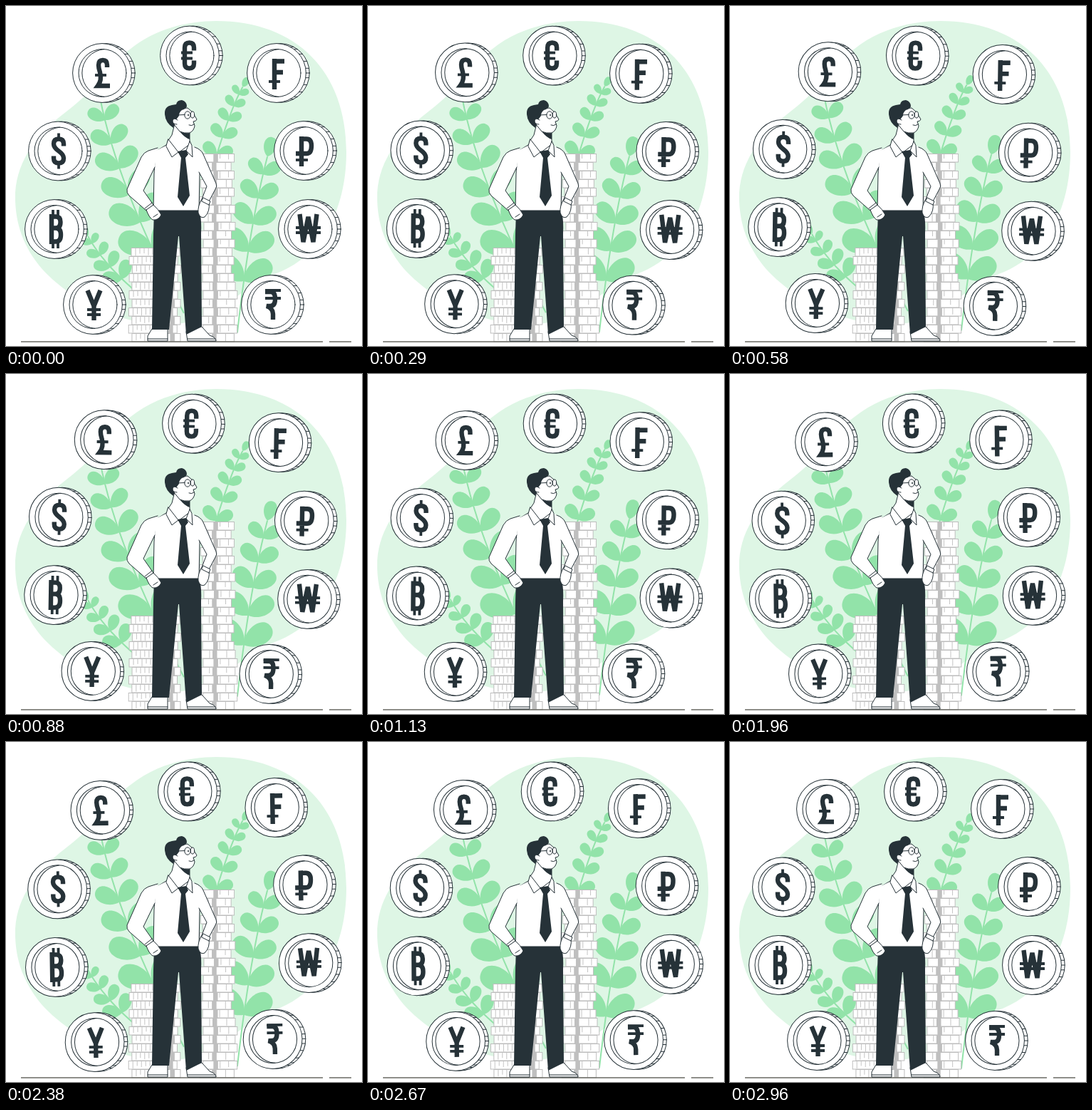
Animation of 500x477 px, one loop 3 s. Source, as an HTML page:

```html
<!DOCTYPE html>
<html lang="en">
<head>
<meta charset="utf-8">
<title>Currencies</title>
<style>
html, body { margin: 0; width: 100%; height: 100%; overflow: hidden; background: #fff; }
svg { display: block; width: 100%; height: 100%; }
.leaf { fill: #92e3a9; }
.stem { fill: none; stroke: #92e3a9; stroke-width: 2; }
.line { fill: #fff; stroke: #263238; stroke-width: 1; stroke-linejoin: round; stroke-linecap: round; }
.thin { fill: none; stroke: #263238; stroke-width: 1; stroke-linecap: round; }
.dark { fill: #263238; }
.bill { fill: #fff; stroke: #bdbdbd; stroke-width: 1; }
.tick { fill: none; stroke: #c4c4c4; stroke-width: 1; }
.band { fill: #bfbfbf; }
.bold { fill: none; stroke: #263238; stroke-width: 6.4; }
.bar { fill: none; stroke: #263238; stroke-width: 3.8; }
</style>
</head>
<body>
<svg viewBox="0 0 500 477">
  <path fill="#def6e5" d="M13 262C16 215 45 178 85 148C135 110 140 85 175 60C210 32 255 21 295 21C408 21 478 92 478 205C478 290 440 350 385 373C330 392 300 440 240 446C150 452 75 400 45 362C22 332 12 300 13 262Z"/>
  <g id="plants"></g>
  <g id="stacks"></g>
  <path d="M21 471H445M454 471H485" stroke="#6b6b64" stroke-width="1.6"/>
  <g id="man">
    <path class="line" d="M205 453L199 463V470H227V453Z"/>
    <path class="line" d="M253 457L255 470H295Q295 465 286 462L275 450Z"/>
    <path class="thin" d="M199 467H227M255 467H294"/>
    <path class="dark" d="M208 287H272Q275 302 274 320L275 450L253 461L243 323H242L229 454H205L207 320Z"/>
    <path class="line" d="M225 195L210 204L208 235L207 287H271L272 235L274 204L259 196Z"/>
    <path class="line" d="M213 199L200 203Q194 205 190 212L170 257Q169 262 173 266L197 287L207 279L193 259L209 226"/>
    <path class="line" d="M265 198Q274 201 277 208L295 249Q297 253 294 257L284 276L275 271L282 253L271 233"/>
    <path fill="#fff" d="M212 202L225 196H262L273 206L270 230H211Z"/>
    <path class="line" d="M197 286L207 279Q214 285 218 293Q214 301 206 300Q201 297 197 286Z"/>
    <path class="thin" d="M195 284L205 276M207 296L213 292"/>
    <path class="line" d="M285 276L275 271Q269 281 270 290Q273 299 279 296Q287 288 285 276Z"/>
    <path class="line" d="M277 269L287 274L285 279L275 274Z"/>
    <path class="line" d="M237 165L233 181L227 190L242 206L258 194V177Z"/>
    <path class="line" d="M238 150Q246 143 255 143L262 149L268 159Q267 162 263 162L265 168Q264 175 258 178Q250 179 244 176L235 165Z"/>
    <path class="dark" d="M244 176Q250 179 258 178V187Q251 185 244 176Z"/>
    <path class="dark" d="M235 171Q224 164 223 152Q222 141 233 139L239 138Q240 132 247 132Q254 134 254 141Q252 145 247 146Q243 149 243 154L240 158Q237 165 235 171Z"/>
    <path class="line" d="M241 160Q235 156 234 161Q234 166 240 166"/>
    <ellipse class="line" cx="255" cy="153" rx="4.2" ry="5.2"/>
    <ellipse class="line" cx="262" cy="152.5" rx="2.6" ry="4.6"/>
    <path class="thin" d="M241 153L251 152.5M257 167Q261 169 264 166"/>
    <circle class="dark" cx="256" cy="153" r="1.1"/>
    <path class="line" d="M228 187L242 205L233 212L225 197Z"/>
    <path class="line" d="M258 190L253 203L262 212L261 196Z"/>
    <path class="dark" d="M241 204L253 202L256 208L252 213L258 266L249 281L241 268L246 213Z"/>
  </g>
  <g id="coins"></g>
</svg>
<script>
const NS = 'http://www.w3.org/2000/svg';
const byId = id => document.getElementById(id);

function add(parent, tag, attrs) {
  const el = document.createElementNS(NS, tag);
  for (const key in attrs) el.setAttribute(key, attrs[key]);
  parent.append(el);
  return el;
}
const path = (parent, cls, d) => add(parent, 'path', { class: cls, d });

let seed = 7;
const random = () => (seed = seed * 16807 % 2147483647) / 2147483647;

function drawLeaf([x, y], angle, size) {
  const w = 0.43 * size;
  path(byId('plants'), 'leaf', `M0 0C${-w} ${-0.28 * size} ${-w} ${-size} 0 ${-size}C${w} ${-size} ${w} ${-0.28 * size} 0 0Z`)
    .setAttribute('transform', `translate(${x} ${y}) rotate(${angle})`);
}

// Leaf pairs grow evenly along a quadratic curve from a to c, one leaf at the tip
function drawPlant(a, b, c, pairs, small, big) {
  const at = t => a.map((v, i) => (1 - t) ** 2 * v + 2 * t * (1 - t) * b[i] + t * t * c[i]);
  const lean = t => {
    const [x, y] = at(t - 0.01), [x2, y2] = at(t + 0.01);
    return Math.atan2(x - x2, y2 - y) * 180 / Math.PI;
  };
  const points = [];
  for (let i = -2; i <= 14; i++) points.push(at(i / 10));
  path(byId('plants'), 'stem', 'M' + points.join('L'));
  drawLeaf(at(-0.2), lean(-0.2), small);
  for (let i = 0; i < pairs; i++) {
    const t = i / (pairs - 1);
    for (const side of [-50, 50]) drawLeaf(at(t), lean(t) * 0.75 + side, small + (big - small) * t);
  }
}

// Rows of banknotes, 12 px high, down to the ground
function drawStack(rows, left, right, band, gap) {
  const g = byId('stacks');
  for (let i = 0; i < rows; i++) {
    const y = 471 - (rows - i) * 12;
    const dx = (i % 2 ? -2 : 2) + random() * 2;
    const x = left + dx, end = right + dx + (y > 380 && rows > 15 ? 4 : 0);
    add(g, 'rect', { class: 'bill', x, y: y + 0.5, width: end - x, height: 11.5 });
    add(g, 'rect', { class: 'band', x: band + dx / 2, y, width: 6.5, height: 12 });
    let d = '';
    for (let tx = x + gap; tx < end - 2; tx += gap)
      if (tx < band - 2 || tx > band + 9) d += `M${tx} ${y + 1}v${6 + random() * 5}`;
    path(g, 'tick', d);
  }
}

// Currency signs: bold strokes, then thin bars
const coins = [
  [258, 69.5, 'M6 -7V-11Q6 -18 -.5 -18Q-7 -18 -7 -11V11Q-7 18 -.5 18Q6 18 6 11V7', 'M-12 -4H4M-12 4H4'],
  [135, 94, 'M7 -8V-11Q7 -18 1 -18Q-5 -18 -5 -11Q-5 -7 -3 -1Q0 10 -6 18H11', 'M-10 3H6'],
  [73, 203.5, 'M8 -7V-10Q8 -17 1 -17Q-6 -17 -6 -10Q-6 -5 1 0Q8 5 8 10Q8 17 1 17Q-6 17 -6 10V7', 'M1 -25V-17M1 17V25'],
  [68, 313, 'M-4 -21V21M-4 -17.5H2Q8.5 -17.5 8.5 -10Q8.5 -1.5 2 -1.5H-4M2 -1.5Q9 -1.5 9 8Q9 17.5 2 17.5H-4', 'M-2 -27V-19M5 -27V-19M-2 19V27M5 19V27'],
  [122, 419, 'M-7.5 -20L1.5 2L10.5 -20M1.5 0V22', 'M-8 7H11M-8 14H11'],
  [380, 94, 'M-3 -20V23M-3 -16.5H11M-3 -1H9', 'M-11 12H5'],
  [418, 203, 'M-3 -20V22M-3 -16.5H4Q11 -16.5 11 -7Q11 4 4 4H-11', 'M-11 13H6'],
  [424, 313, 'M-11.5 -21L-6.5 18L.5 -17L7.5 18L12.5 -21', 'M-17 -2H18M-17 5H18'],
  [372, 419, 'M-8 -18H0Q6 -18 6 -8Q6 2 -1 2H-6Q3 5 3 13V21', 'M-8 -20H14M-8 -9H14']
];

function drawCoin([x, y, bold, bars]) {
  const g = add(byId('coins'), 'g', { transform: `translate(${x} ${y})` });
  const disc = (cx, r) => add(g, 'circle', { class: 'line', cx, cy: 0, r });
  disc(4.8, 41.4);
  let d = '';
  for (let i = -5; i <= 5; i++) {
    const t = i * 0.22 + Math.sin(i * 5) * 0.06;
    d += `M${41.4 * Math.cos(t)} ${41.4 * Math.sin(t)}h4.8`;
  }
  path(g, 'thin', d);
  disc(0, 41.4);
  disc(0.5, 33.5);
  path(g, 'thin', 'M2.75 -33.4A33.5 33.5 0 0 0 2.75 33.4');
  path(g, 'bold', bold);
  path(g, 'bar', bars);
}

drawPlant([139, 160], [159, 240], [207, 344], 6, 27, 52);
drawPlant([121, 333], [137, 358], [163, 383], 4, 16, 28);
drawPlant([327, 124], [313, 153], [295, 212], 5, 15, 26);
drawPlant([361, 236], [346, 300], [334, 386], 5, 28, 46);
drawStack(11, 174, 242, 229, 6);
drawStack(22, 274, 318, 290, 12);
coins.forEach(drawCoin);

const LOOP = 3000;

function draw(now) {
  const turn = now % LOOP / LOOP * 2 * Math.PI;
  const s = Math.sin(turn);
  const lift = 4.5 * (Math.cos(turn) - 1);
  byId('coins').setAttribute('transform', `rotate(${s * Math.abs(s)} 250 258)`);
  byId('plants').setAttribute('transform', `translate(0 ${lift})`);
}

const start = performance.now();
function tick() {
  draw(performance.now() - start);
  requestAnimationFrame(tick);
}
tick();
</script>
</body>
</html>
```
